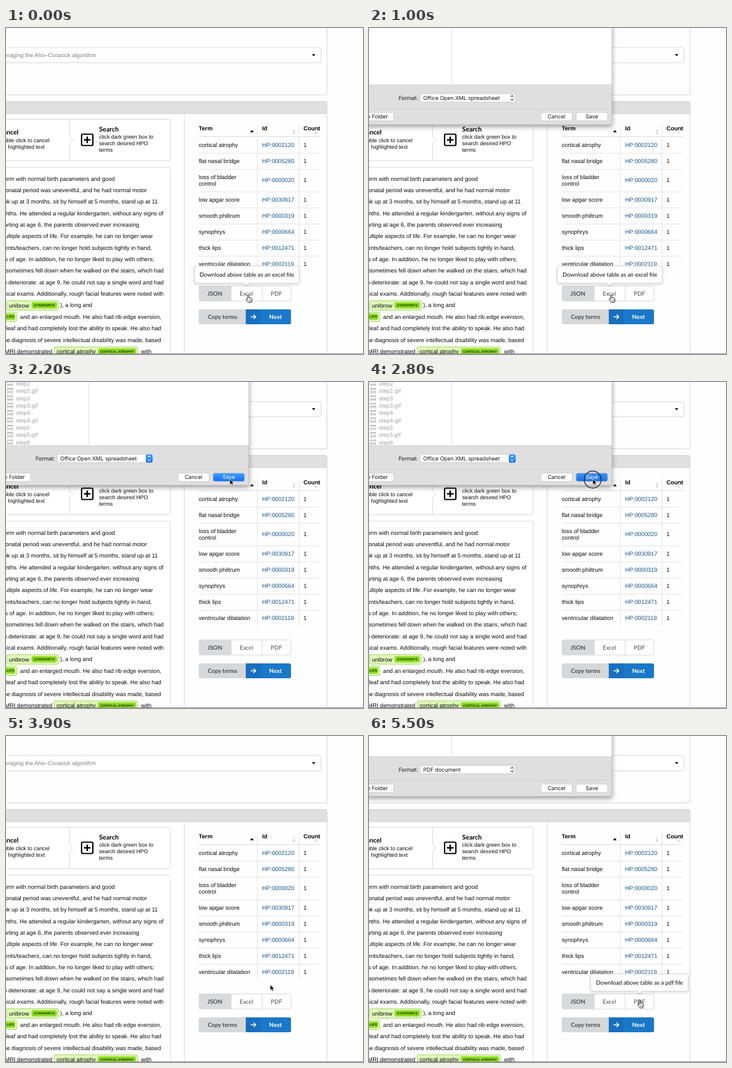
An HTML page that plays this animation: 600x548 px, repeating every 5.6 s.

```html
<!DOCTYPE html>
<html lang="en">
<head>
<meta charset="utf-8">
<title>Export terms</title>
<style>
html, body { margin: 0; width: 100%; height: 100%; overflow: hidden; background: #fefefe; }
svg { display: block; width: 600px; height: 548px; }
text { font: 9.73px "Liberation Sans", Arial, sans-serif; fill: #0c0c0c; white-space: pre; text-rendering: geometricPrecision; }
.bold { font-weight: 700; fill: #000; }
.small { font-size: 9.15px; }
.title { font: 700 11px Lato, sans-serif; fill: #000; }
.btn { font: 700 9.8px Lato, sans-serif; fill: #4c4c4c; }
.light { font-weight: 400; }
.white { fill: #fff; }
.link { fill: #14558f; }
.hint { fill: #808080; }
.tip { font: 9.7px Lato, sans-serif; }
.tag { font: italic 700 5.6px "Liberation Sans", Arial, sans-serif; fill: #0d3300; }
.mac { font: 9.2px Inter, sans-serif; letter-spacing: -.1px; fill: #161616; }
.file { fill: #a2a2a2; }
</style>
</head>
<body>
<svg id="stage" viewBox="0 0 600 548" xmlns="http://www.w3.org/2000/svg"></svg>
<script>
const LOOP = 5600, STEP = 100;
const EDGE = '#d6d6d8';

const text = (x, y, s, cls = '', anchor = 'start') =>
  `<text x="${x}" y="${y}" class="${cls}" text-anchor="${anchor}">${s}</text>`;
const box = (x, y, w, h, fill, stroke = 'none', r = 0, more = '') =>
  `<rect x="${x}" y="${y}" width="${w}" height="${h}" rx="${r}" fill="${fill}" stroke="${stroke}" ${more}/>`;
const path = (d, fill = 'none', stroke = 'none', w = 1, more = '') =>
  `<path d="${d}" fill="${fill}" stroke="${stroke}" stroke-width="${w}" ${more}/>`;
const line = (d, color = EDGE, w = 1) => path(d, 'none', color, w);

function topPanel() {
  return line('M0 112.5H539.5V0') +
    box(-10, 33, 539.5, 25.5, '#fff', EDGE, 3) +
    text(151, 49.1, 'leveraging the Aho–Corasick algorithm', 'hint', 'end') +
    path('M514 44h6l-3 3.4z', '#111');
}

function steps() {
  return box(-10, 153.5, 286, 69.5, '#fff', EDGE, 3) +
    line('M106.5 153.5V182l6.5 6.5-6.5 6.5V223') +
    text(21, 179.3, 'Cancel', 'title', 'end') +
    text(73, 191.6, 'double click to cancel', 'small', 'end') +
    text(65, 202.6, 'highlighted text', 'small', 'end') +
    box(127, 178.5, 19, 19, '#fff', '#000', 2, 'stroke-width="2.2"') +
    line('M136.5 182.5v11M131 188h11', '#000', 2.5) +
    text(156.5, 174.2, 'Search', 'title') +
    ['click dark green box to', 'search desired HPO', 'terms']
      .map((s, i) => text(156.5, 186.3 + i * 11, s, 'small')).join('');
}

function chip(x, y, right, tagX, label, tag) {
  return box(x, y, right - x, 16, '#e0f8ba', '#a5d65c', 2) +
    text(x + 4, y + 11.2, label) +
    box(tagX, y + 3, right - 3 - tagX, 9.6, '#8fdf1b', '#78c814', 2, 'stroke-width=".6"') +
    text((tagX + right - 3) / 2, y + 9.8, tag, 'tag', 'middle');
}

function note() {
  const lines = [
    [183, 'term with normal birth parameters and good'],
    [237, 'neonatal period was uneventful, and he had normal motor'],
    [255, 'look up at 3 months, sit by himself at 5 months, stand up at 11'],
    [264.5, 'months. He attended a regular kindergarten, without any signs of'],
    [224, 'starting at age 6, the parents observed ever increasing'],
    [247, 'multiple aspects of life. For example, he can no longer wear'],
    [245, 'parents/teachers, can no longer hold subjects tightly in hand,'],
    [249, 'months of age. In addition, he no longer liked to play with others;'],
    [265, 'sometimes fell down when he walked on the stairs, which had'],
    [265, 'to deteriorate: at age 9, he could not say a single word and had'],
    [265, 'physical exams. Additionally, rough facial features were noted with'],
    [145, '), a long and'],
    [261, 'and an enlarged mouth. He also had rib edge eversion,'],
    [261, 'leaf and had completely lost the ability to speak. He also had'],
    [260.5, 'the diagnosis of severe intellectual disability was made, based'],
    [78, 'MRI demonstrated']
  ];
  return box(-10, 234, 286, 340, '#fff', EDGE, 3) +
    lines.map(([x, s], i) => text(x, 256.5 + i * 19.36, s, '', 'end')).join('') +
    chip(1, 458.3, 88, 43.5, 'unibrow', 'SYNOPHRYS') +
    chip(-50, 477.5, 18, -19, 'thick', 'THICK LIPS') +
    chip(81, 536, 221, 155, 'cortical atrophy', 'CORTICAL ATROPHY') +
    text(227, 546.9, 'with');
}

const sorter = x => path(`M${x - 2.5} 173.2h5l-2.5-2.8zM${x - 2.5} 175.2h5l-2.5 2.8z`, '#c9c9c9');

function table() {
  const rows = [
    ['cortical atrophy', '0002120', 196.5], ['flat nasal bridge', '0005280', 223.5],
    ['loss of bladder|control', '0000020', 256], ['low apgar score', '0030917', 289],
    ['smooth philtrum', '0000319', 316], ['synophrys', '0000664', 343],
    ['thick lips', '0012471', 370], ['ventricular dilatation', '0002119', 397]
  ];
  let out = line('M422.5 162V410M492.5 162V410', '#e2e2e3') + line('M324 182.5H528', '#dcdcdd') +
    text(324, 171.6, 'Term', 'bold') + text(430.5, 171.6, 'Id', 'bold') +
    text(500, 171.6, 'Count', 'bold') +
    path('M410 175.2h6.4l-3.2-3.8z', '#000') + sorter(484) + sorter(520.5);
  rows.forEach(([term, id, y], i) => {
    const parts = term.split('|');
    parts.forEach((s, k) =>
      out += text(324, y + 3.3 + (k - (parts.length - 1) / 2) * 11.4, s));
    out += text(430.5, y + 3.3, 'HP:' + id, 'link') + text(500, y + 3.3, '1');
    const half = parts.length > 1 ? 19.5 : 13.5;
    if (i < rows.length - 1) out += line(`M324 ${Math.round(y + half - .5) + .5}H528`, '#e4e4e5');
  });
  return out;
}

function buttons() {
  return box(324.5, 433.5, 154.5, 25.5, '#fff', EDGE, 3) +
    path('M379 433H327a3 3 0 0 0-3 3v20a3 3 0 0 0 3 3H379z', '#d9dadb') +
    line('M430.5 433.5V459') +
    text(351, 449.6, 'JSON', 'btn', 'middle') +
    text(404, 449.8, 'Excel', 'btn light', 'middle') +
    text(454.5, 449.8, 'PDF', 'btn light', 'middle') +
    path('M403 473H327a3 3 0 0 0-3 3v19a3 3 0 0 0 3 3H403z', '#d6d7d8') +
    path('M403 473h73a3 3 0 0 1 3 3v19a3 3 0 0 1-3 3H403z', '#1b78c9') +
    box(403, 473, 25, 25, '#1870bd') +
    text(364, 489.1, 'Copy terms', 'btn', 'middle') +
    line('M411 485.5h8.5M416 481.7l3.8 3.8-3.8 3.8', '#fff', 1.5) +
    text(453, 489, 'Next', 'btn white', 'middle');
}

function page() {
  return box(0, 0, 600, 548, '#fefefe') + topPanel() +
    line('M539.5 143V548M299.5 144V548') +
    path('M-5 123.5H536.5a3 3 0 0 1 3 3V144H-5z', '#e1e0e1', '#cfcfcf') +
    steps() + note() + table() + buttons();
}

function popup(id, x, right, tip, label) {
  const d = `M${x + 3} 400H${right - 3}q3 0 3 3V426q0 3-3 3H${tip + 4}l-4 4-4-4H${x + 3}q-3 0-3-3V403q0-3 3-3z`;
  return `<g id="${id}">` + path(d, '#fff', '#d0d0d2', 1, 'filter="url(#soft)"') +
    text((x + right) / 2, 417.8, label, 'tip', 'middle') + '</g>';
}

const macButton = (x, right, fill, id) =>
  box(x, -20.5, right - x, 14, fill, '#c3c3c3', 3, `stroke-width=".8" id="${id}"`);

// The sheet is drawn with its bottom edge at y = 0.
function sheet() {
  let files = '';
  for (let i = 0; i < 9; i++) {
    const y = -72 - i * 12.35;
    const name = 'step' + (6 - Math.ceil(i / 2)) + (i % 2 ? '.gif' : '');
    files += text(16.5, y + 3.2, name, 'mac file') +
      box(2, y - 4.5, 9.5, 8.5, '#f3f3f3', '#c8c8c8', 0, 'stroke-width=".7"') +
      line(`M2 ${y - 3.6}h9.5M2 ${y + 1.6}h9.5`, '#a8a8a8', 1.2);
  }
  return '<g id="sheet">' +
    box(-20, -260, 428, 260, '#dfdfdf', '#b5b5b5', 0, 'stroke-width=".8" filter="url(#deep)"') +
    box(-20, -260, 427.6, 194, '#fff') +
    line('M0 -66.5H407.6', '#c6c6c6') + line('M139 -260V-67', '#dcdcdc') +
    line('M0 -26.5H407.6', '#cfcfcf') +
    `<g id="files">${files}</g>` +
    text(82, -41.8, 'Format:', 'mac', 'end') +
    box(86, -52, 160, 14, '#fff', '#c3c3c3', 3, 'stroke-width=".8"') +
    '<text id="format" class="mac" x="91" y="-41.8"></text>' +
    box(235, -52, 11.4, 14, 'url(#blue)', 'none', 3, 'id="stepper"') +
    path('M238.2 -46.6l2.4-2.6 2.4 2.6M238.2 -43.4l2.4 2.6 2.4-2.6', 'none', '#333', 1.1, 'id="chevrons"') +
    macButton(-30, 41.5, '#fff', 'folder') + text(31.5, -10.2, 'New Folder', 'mac', 'end') +
    macButton(289, 341.5, '#fff', 'cancel') + text(315, -10.2, 'Cancel', 'mac', 'middle') +
    macButton(348, 401, '#fff', 'save') +
    '<text id="saveText" class="mac" x="374.5" y="-10.2" text-anchor="middle">Save</text></g>';
}

function pointer() {
  return '<circle id="ring" cy="1" r="14.3" fill="none" stroke="#111" stroke-width="1.2"/>' +
    '<g id="arrow">' +
    path('M0 0V9.8L2.3 7.7 3.9 11.3 5.6 10.5 4.1 7.1H7.1z', '#000', '#fff', .8) + '</g>' +
    '<g id="hand">' +
    path('M-1 1Q-1 0 0 0T1.1 1V5Q1.3 4.1 2.2 4.2T3.1 5.2Q3.3 4.5 4.1 4.7T4.9 5.8Q5.3 5.2 5.9 5.6T6.4 7V9Q6.2 10.5 5.3 12.5H.3Q-1.5 9.8-3.3 7.8-3.9 6.8-3 6.3T-1 7.3z', '#fff', '#111', .9) +
    line('M1.3 8v2.8M3 8v2.8M4.6 8v2.8', '#222', .6) + '</g>';
}

const gradient = (id, top, bottom) =>
  `<linearGradient id="${id}" x2="0" y2="1"><stop stop-color="${top}"/><stop offset="1" stop-color="${bottom}"/></linearGradient>`;
const defs = '<defs>' + gradient('blue', '#459ffb', '#0a6ffa') + gradient('pressed', '#3d92f2', '#1a6fe6') +
  `<filter id="soft" x="-10%" y="-30%" width="120%" height="170%"><feDropShadow dx="0" dy="1.5" stdDeviation="2" flood-opacity=".16"/></filter>
<filter id="deep" x="-10%" y="-10%" width="120%" height="125%"><feDropShadow dx="0" dy="3" stdDeviation="4" flood-opacity=".4"/></filter>
</defs>`;

const stage = document.getElementById('stage');
stage.innerHTML = defs + page() +
  popup('excelTip', 316.5, 493, 404, 'Download above table as an excel file') +
  popup('pdfTip', 372.5, 536.5, 455, 'Download above table as a pdf file') +
  sheet() + box(0, 547, 600, 1, '#8f8f8f') + pointer();

const el = {};
stage.querySelectorAll('[id]').forEach(n => el[n.id] = n);

const cursorKeys = [[0, 407, 449], [1100, 407, 449], [1500, 367, 142], [1800, 376, 163],
  [3300, 376, 163], [3700, 402, 262], [3900, 444, 418], [4100, 455, 444.5]];
const sheetKeys = [[0, -20], [800, -20], [900, 92], [1000, 162.4], [1100, 173.6], [3100, 173.6],
  [3200, 134.6], [3300, 60], [3400, -20], [5300, -20], [5400, 35], [5500, 101.4]];
const clicks = [[300, 500], [2700, 3000], [4700, 4900]];

function at(keys, t) {
  const i = keys.findIndex(k => k[0] > t);
  if (i < 0) return keys[keys.length - 1].slice(1);
  const a = keys[i - 1], b = keys[i], u = (t - a[0]) / (b[0] - a[0]);
  return a.slice(1).map((v, k) => v + (b[k + 1] - v) * u);
}

const show = (node, on) => node.setAttribute('visibility', on ? 'visible' : 'hidden');
const move = (node, x, y) => node.setAttribute('transform', `translate(${x} ${y})`);

function draw(ms) {
  const t = Math.floor(ms / STEP) * STEP;
  const [x, y] = at(cursorKeys, t), [bottom] = at(sheetKeys, t);
  const onButton = t < 1200 || t >= 4000;
  const active = t >= 1200 && t < 3500;
  const down = clicks.some(([a, b]) => t >= a && t <= b);

  move(el.sheet, 0, bottom);
  show(el.sheet, bottom > -20);
  el.files.setAttribute('opacity', active ? 1 : 0);
  el.stepper.setAttribute('opacity', active ? 1 : 0);
  el.chevrons.setAttribute('stroke', active ? '#fff' : '#333');
  el.format.textContent = t < 4000 ? 'Office Open XML spreadsheet' : 'PDF document';
  el.save.setAttribute('fill', !active ? '#fff' : down ? 'url(#pressed)' : 'url(#blue)');
  el.saveText.style.fill = active ? '#fff' : '#161616';

  show(el.excelTip, t < 1200);
  show(el.pdfTip, t >= 4100);
  el.pdfTip.setAttribute('opacity', Math.min(1, Math.max(0, (t - 4000) / 200)));

  show(el.hand, onButton);
  show(el.arrow, !onButton);
  show(el.ring, down);
  [el.hand, el.arrow, el.ring].forEach(n => move(n, x, y));
}

const start = performance.now();
function tick() {
  draw((performance.now() - start) % LOOP);
  requestAnimationFrame(tick);
}
tick();
</script>
</body>
</html>
```
